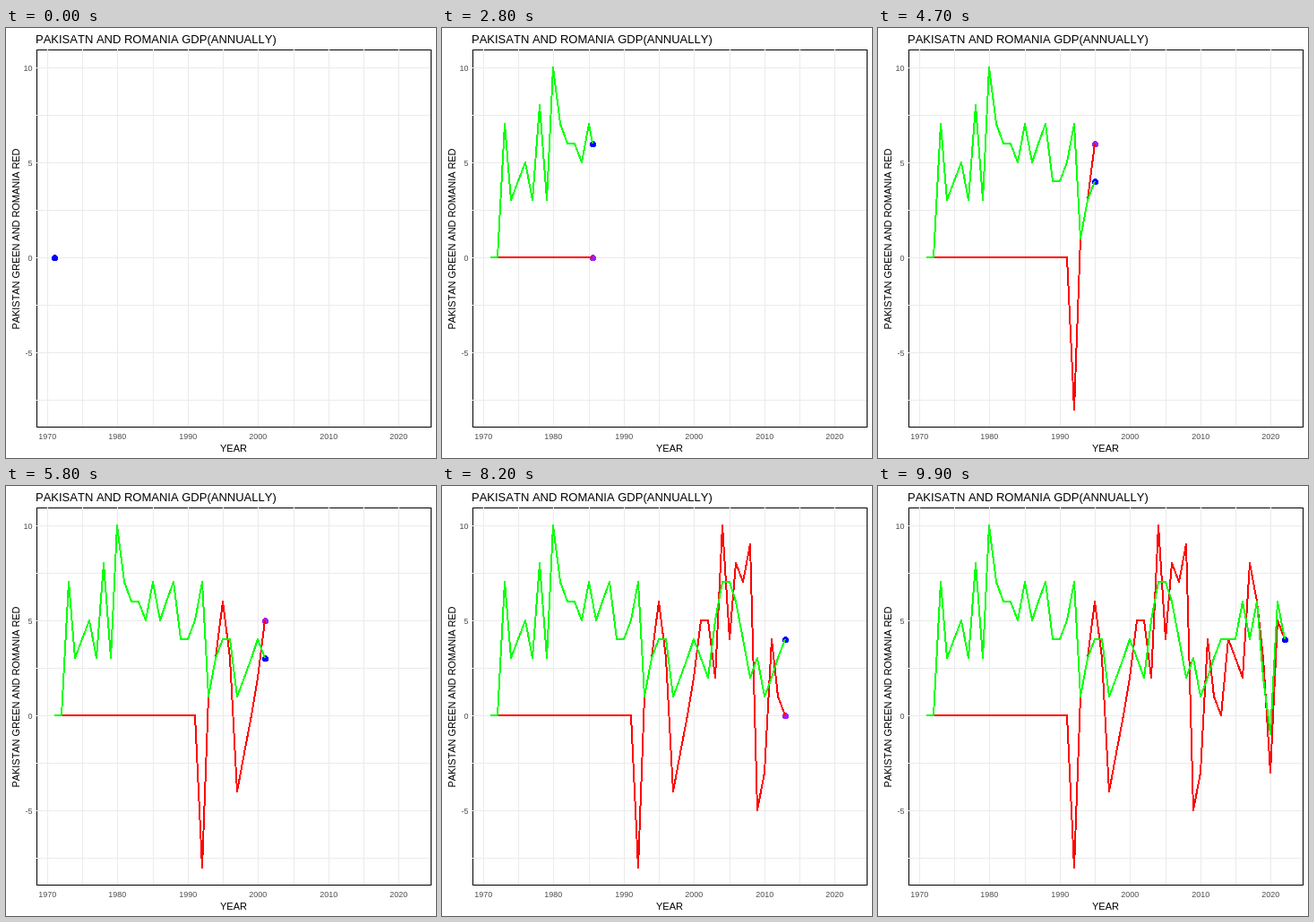
An HTML page that plays this animation: 480 px wide and 480 px high, repeating every 10 s.

```html
<!DOCTYPE html>
<html lang="en">
<head>
<meta charset="utf-8">
<title>GDP chart</title>
<style>
  html, body { margin: 0; width: 100%; height: 100%; overflow: hidden; background: #fff; }
  svg { display: block; width: 480px; height: 480px; }
  text { font-family: "Liberation Sans", Arial, sans-serif; font-size: 11px; font-kerning: none; }
  .tick { font-size: 9px; fill: #4d4d4d; }
  .title { font-size: 13px; }
  .ylab { letter-spacing: -.05px; }
  .frame { fill: #fff; stroke: #000; }
  .grid { stroke: #ebebeb; }
  .line { fill: none; stroke-width: 2; stroke-linejoin: round; }
  .frame, .grid, .line, circle { shape-rendering: crispEdges; }
</style>
</head>
<body>
<svg viewBox="0 0 480 480">
  <rect class="frame" x="34.5" y="24.5" width="440" height="421"/>
  <g id="axes"></g>
  <text class="title" x="33" y="17">PAKISATN AND ROMANIA GDP(ANNUALLY)</text>
  <text x="254" y="473" text-anchor="middle">YEAR</text>
  <text class="ylab" transform="translate(15 235.5) rotate(-90)" text-anchor="middle">PAKISTAN GREEN AND ROMANIA RED</text>
  <g id="plot"></g>
</svg>
<script>
const START = 1971, YEARS = 51, STEPS = 100, STEP_MS = 100;

const pakistan = [
  0, 0, 7, 3, 4, 5, 3, 8, 3, 10, 7, 6, 6, 5, 7, 5, 6, 7, 4, 4, 5, 7, 1, 3, 4, 4,
  1, 2, 3, 4, 3, 2, 5, 7, 7, 6, 4, 2, 3, 1, 2, 3, 4, 4, 4, 6, 4, 6, 2, -1, 6, 4
];
const romania = [
  ...Array(21).fill(0), -8, 1, 3, 6, 3, -4, -2, 0, 2, 5, 5, 2, 10, 4, 8, 7, 9,
  -5, -3, 4, 1, 0, 4, 3, 2, 8, 6, 3, -3, 5, 4
];

const px = year => Math.round(53.9 + (year - START) * 400 / YEARS);
const py = value => Math.round(256 - value * 21.22);

function add(parent, tag, attrs, text = "") {
  const el = document.createElementNS("http://www.w3.org/2000/svg", tag);
  for (const name in attrs) el.setAttribute(name, attrs[name]);
  el.textContent = text;
  return parent.appendChild(el);
}

const axes = document.getElementById("axes");
for (let year = 1970; year <= 2020; year += 5) {
  const x = px(year);
  add(axes, "line", { class: "grid", x1: x + .5, x2: x + .5, y1: 24, y2: 445 });
  if (year % 10 === 0) add(axes, "text", { class: "tick", x: x + .3, y: 459, "text-anchor": "middle" }, year);
}
for (let value = -7.5; value <= 10; value += 2.5) {
  const y = py(value);
  add(axes, "line", { class: "grid", x1: 34, x2: 474, y1: y + .5, y2: y + .5 });
  if (value % 5 === 0) add(axes, "text", { class: "tick", x: 29.5, y: y + 4, "text-anchor": "end" }, value);
}

const plot = document.getElementById("plot");
const series = [
  { data: romania, dot: "#a020f0", line: "#f00" },
  { data: pakistan, dot: "#00f", line: "#0f0" }
].map(({ data, dot, line }) => ({
  data,
  dot: add(plot, "circle", { r: 3.5, fill: dot }),
  line: add(plot, "polyline", { class: "line", stroke: line })
}));

// Each year lands on a whole step; steps in between are interpolated.
const yearStep = i => Math.round(i * (STEPS - 1) / YEARS);

function progress(step) {
  let i = 0;
  while (i < YEARS && yearStep(i + 1) <= step) i++;
  if (i === YEARS) return i;
  return i + (step - yearStep(i)) / (yearStep(i + 1) - yearStep(i));
}

function draw(step) {
  const pos = progress(step), last = Math.floor(pos), part = pos - last;
  for (const { data, dot, line } of series) {
    const points = data.slice(0, last + 1).map((v, i) => [px(START + i), py(v)]);
    if (part) {
      const value = data[last] + (data[last + 1] - data[last]) * part;
      points.push([px(START + pos), py(value)]);
    }
    const [x, y] = points[points.length - 1];
    dot.setAttribute("cx", x + .5);
    dot.setAttribute("cy", y + .5);
    line.setAttribute("points", points.length > 1 ? points.join(" ") : "");
  }
}

let shown = 0;
const begin = performance.now();
function tick() {
  const step = Math.floor(Math.max(0, performance.now() - begin) / STEP_MS) % STEPS;
  if (step !== shown) draw(shown = step);
  requestAnimationFrame(tick);
}
draw(0);
requestAnimationFrame(tick);
</script>
</body>
</html>
```
